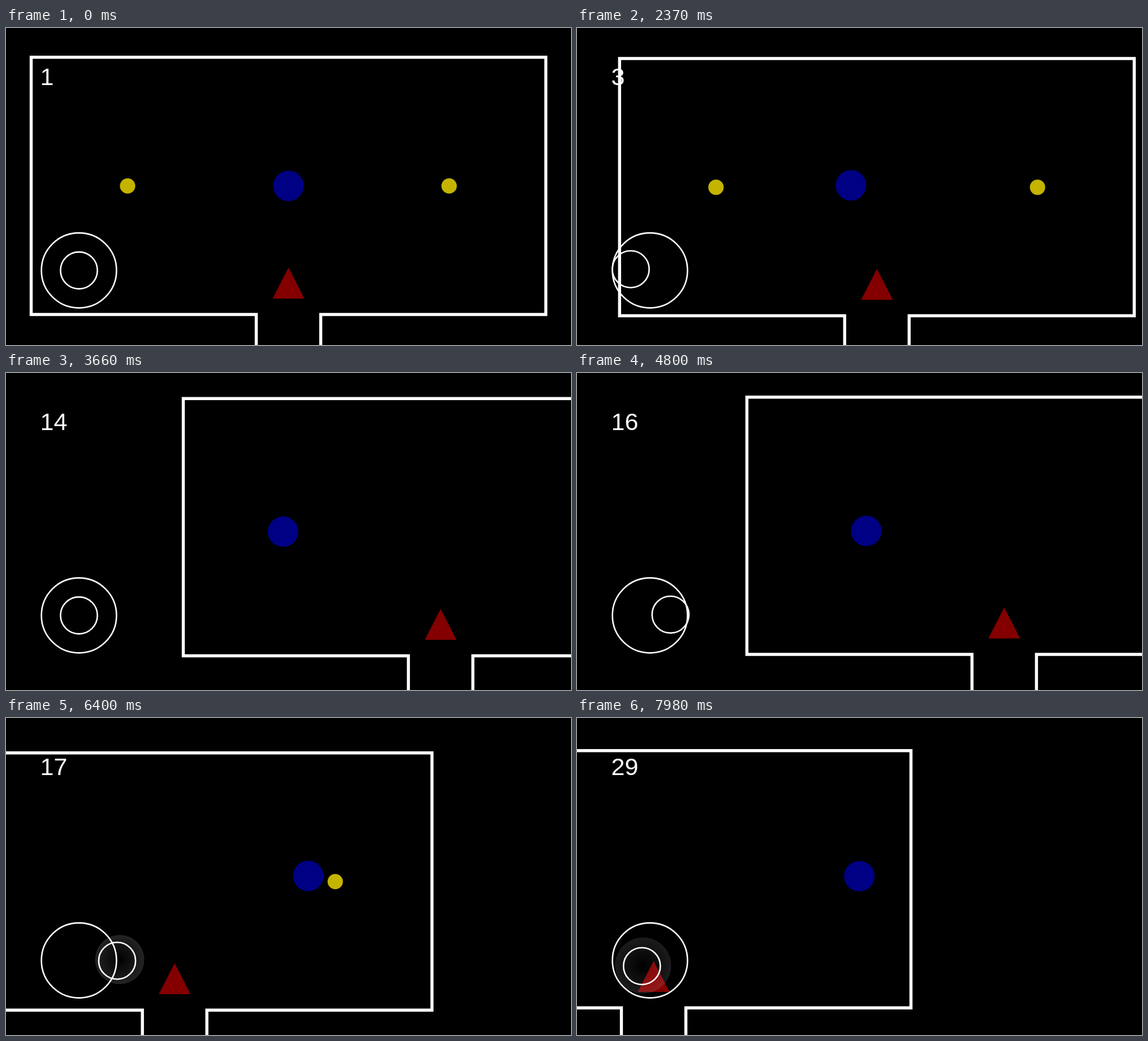
Write an HTML page with a canvas that moves like this. It is 999 px wide and 561 px high and loops after 8000 ms.

```html
<!DOCTYPE html>
<html lang="en">
<head>
<meta charset="utf-8">
<title>Joystick game</title>
<style>
  html, body { margin: 0; height: 100%; overflow: hidden; background: #000; }
  canvas { display: block; width: 100vw; height: 100vh; }
</style>
</head>
<body>
<canvas id="stage" width="999" height="561"></canvas>
<script>
const ctx = document.getElementById('stage').getContext('2d');
const LOOP = 8000, TAU = Math.PI * 2;
const SPEED = 4.65;  // player px/s for each px of stick
const LAG = 110;     // the camera trails the player by this many ms
const REACH = 67.5;  // furthest the stick goes
const HOME = { x: 499.5, y: 279.5 };

// where the room stands on screen at the turning points
const stops = [
  { t: 1970, x: 0, y: 0 },
  { t: 3020, x: 139, y: 7 },
  { t: 3750, x: 273, y: -7 },
  { t: 4550, x: 273, y: -7 },
  { t: 4800, x: 256, y: -9 },
  { t: 5780, x: -4, y: 5 },
  { t: 6400, x: -201, y: 10 },
  { t: 6700, x: -296, y: 9 },
  { t: 7140, x: -361, y: 7 },
  { t: 7980, x: -364, y: 6 },
  { t: 8100, x: -357, y: 1 }
];

const slope = (i, a) =>
  (stops[i + 1][a] - stops[i][a]) / (stops[i + 1].t - stops[i].t);

// harmonic mean of the neighbouring slopes keeps the curve free of overshoot
function tangent(i, a) {
  if (i === 0) return 0;
  if (i === stops.length - 1) return slope(i - 1, a);
  const p = slope(i - 1, a), q = slope(i, a);
  return p * q > 0 ? 2 * p * q / (p + q) : 0;
}

// cubic Hermite curve: position in px and velocity in px/ms
function curve(t, a) {
  if (t <= stops[0].t) return { pos: 0, vel: 0 };
  const i = Math.max(0, stops.findIndex(s => s.t >= t) - 1);
  const h = stops[i + 1].t - stops[i].t, u = (t - stops[i].t) / h;
  const d = slope(i, a), m = tangent(i, a), n = tangent(i + 1, a);
  const b = 3 * d - 2 * m - n, c = m + n - 2 * d;
  return {
    pos: stops[i][a] + h * u * (m + u * (b + u * c)),
    vel: m + u * (2 * b + 3 * u * c)
  };
}

// the ball leads the camera, and the stick leads the ball
function poseAt(t) {
  const room = {}, lead = {}, stick = {};
  for (const a of ['x', 'y']) {
    const now = curve(t, a);
    room[a] = now.pos;
    lead[a] = -now.vel * LAG;
    stick[a] = -curve(t + LAG, a).vel * 1000 / SPEED;
  }
  const k = Math.min(1, REACH / (Math.hypot(stick.x, stick.y) || 1));
  stick.x *= k;
  stick.y *= k;
  return { room, lead, stick };
}

const coins = [{ x: 215, y: 279.5 }, { x: 783.5, y: 279.5 }];
for (const c of coins) {
  const apart = t => {
    const { room, lead } = poseAt(t);
    return Math.hypot(HOME.x + lead.x - room.x - c.x, HOME.y + lead.y - room.y - c.y);
  };
  c.taken = 0;
  while (c.taken < LOOP && apart(c.taken) > 40.5) c.taken += 10;
}

const touches = [
  { from: 6330, to: 6520, x: 201, y: 427.5, r: 43.5, alpha: 0.14 },
  { from: 7840, to: 8000, x: 117, y: 438, r: 49.5, alpha: 0.11 }
];

function disc(x, y, r, fill) {
  ctx.beginPath();
  ctx.arc(x, y, r, 0, TAU);
  ctx.fillStyle = fill;
  ctx.fill();
}

function ring(x, y, r) {
  ctx.beginPath();
  ctx.arc(x, y, r, 0, TAU);
  ctx.lineWidth = 2.6;
  ctx.stroke();
}

function path(points) {
  ctx.beginPath();
  points.forEach(([x, y]) => ctx.lineTo(x, y));
}

function drawRoom(t) {
  path([[442.5, 700], [442.5, 507], [44.5, 507], [44.5, 51.7],
        [954.5, 51.7], [954.5, 507], [556.5, 507], [556.5, 700]]);
  ctx.lineWidth = 5.4;
  ctx.stroke();
  path([[499.5, 424], [527.5, 478.7], [471.5, 478.7]]);
  ctx.fillStyle = '#840000';
  ctx.fill();
  for (const c of coins) if (t < c.taken) disc(c.x, c.y, 13.6, '#c4b400');
}

function drawTouch({ x, y, r, alpha }) {
  const g = ctx.createRadialGradient(x, y, 0, x, y, r);
  g.addColorStop(0, 'rgba(255,255,255,0)');
  g.addColorStop(1, `rgba(255,255,255,${alpha})`);
  disc(x, y, r, g);
}

function draw(t) {
  const { room, lead, stick } = poseAt(t);
  ctx.fillStyle = '#000';
  ctx.fillRect(0, 0, 999, 561);
  ctx.strokeStyle = '#fff';

  ctx.save();
  ctx.translate(room.x, room.y);
  drawRoom(t);
  ctx.restore();
  disc(HOME.x + lead.x, HOME.y + lead.y, 27, '#000084');

  ring(129, 429, 66.4);
  ring(129 + stick.x, 429 + stick.y, 32.6);

  // one point about every second, ten for each coin
  const score = 1 + Math.floor((t + 180) / 990)
    + 10 * coins.filter(c => t >= c.taken).length;
  ctx.fillStyle = '#fff';
  ctx.font = '43px "Liberation Sans", Arial, sans-serif';
  ctx.fillText(score, 60.5, 101);

  touches.filter(k => t >= k.from && t < k.to).forEach(drawTouch);
}

const start = performance.now();
function frame() {
  draw((performance.now() - start) % LOOP);
  requestAnimationFrame(frame);
}
frame();
</script>
</body>
</html>
```
